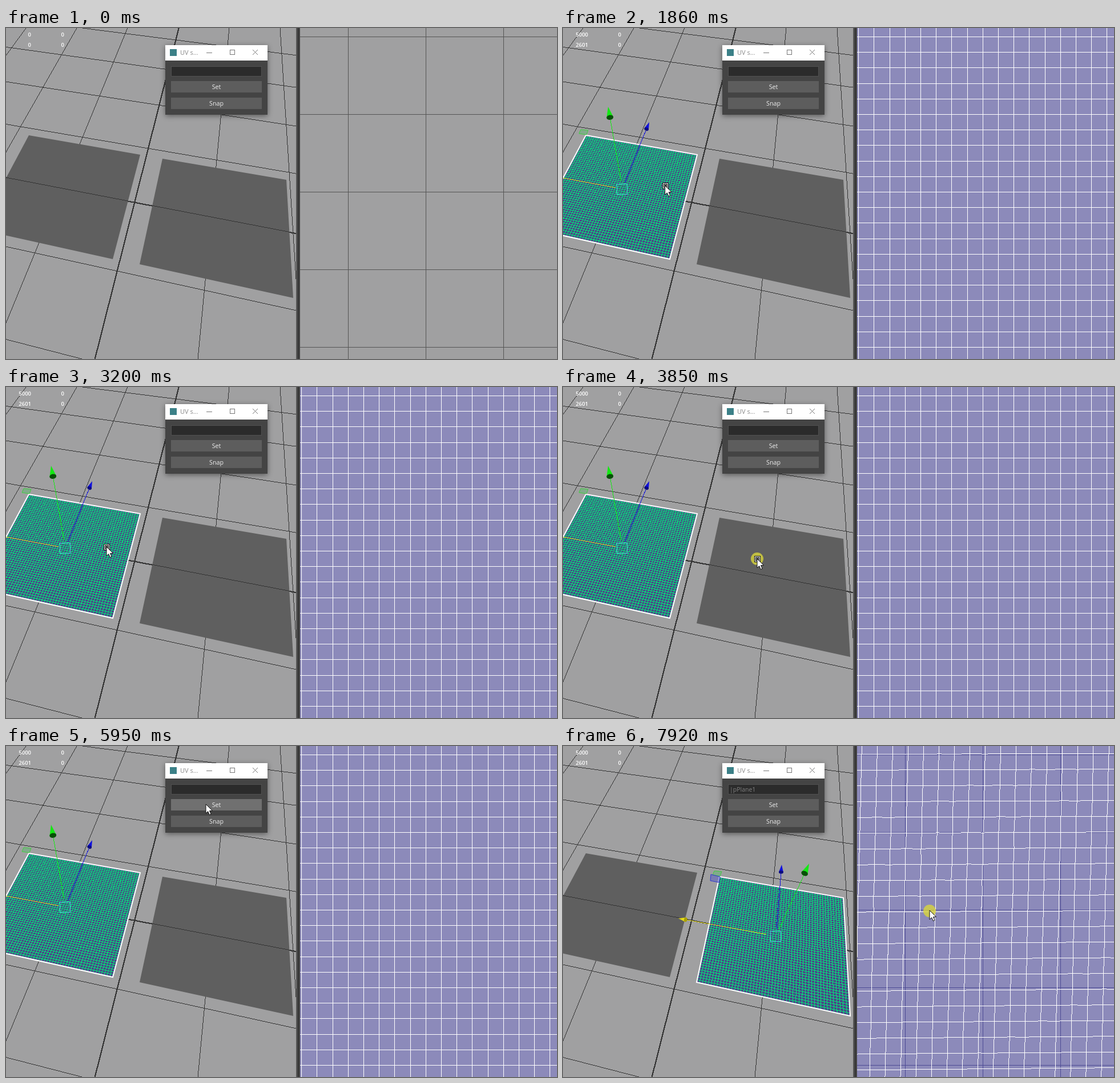
Write an HTML page with a canvas that moves like this. It is 965 px wide and 580 px high and loops after 8 s.

```html
<!DOCTYPE html>
<html lang="en">
<head>
<meta charset="utf-8">
<title>UV snap tool</title>
<style>
  html, body { margin: 0; width: 100%; height: 100%; overflow: hidden; background: #a0a0a1; }
  canvas { display: block; }
</style>
</head>
<body>
<canvas id="stage" width="965" height="580"></canvas>
<script>
const LOOP = 8000, LAG = 100, HOLD = 120, PRESS = 110, ARRIVE = 140;
const WIDTH = 965, HEIGHT = 580, VIEW_W = 508, UV_X = 515, CELL = 27.2;
const GREY = '#a0a0a1', DARK = '#343434';
const FONT = '"Open Sans", "Noto Sans", sans-serif';
const stage = document.getElementById('stage').getContext('2d');
let ctx = stage;

// Corners run top left, top right, bottom right, bottom left.
const ground = projector([[163.9, 119.2], [376.6, 151.8], [347.4, 459.6], [50.6, 394.2]]);
const planes = {
  left: {
    quad: [[40, 188], [235, 222], [187, 405], [-48, 353]],
    center: [104, 282], up: [79, 138], depth: [151, 165], side: [-20, 259]
  },
  right: {
    quad: [[274, 229], [491, 266], [503, 473], [234, 414]],
    center: [373, 333], up: [431, 206], depth: [383, 208], side: [202, 302]
  }
};

// Where the pointer stops, and what its click does.
const stops = [
  { time: 0, x: 540, y: 590 },
  { time: 940, x: 319, y: 332, pick: 'right' },
  { time: 1740, x: 178, y: 275, pick: 'left' },
  { time: 2480, x: 333, y: 312, pick: 'right' },
  { time: 3100, x: 176, y: 279, pick: 'left' },
  { time: 3900, x: 340, y: 300, pick: 'right' },
  { time: 4690, x: 190, y: 257, pick: 'left' },
  { time: 6090, x: 350, y: 102, button: 'Set' },
  { time: 6760, x: 335, y: 310, pick: 'right' },
  { time: 7330, x: 748, y: 312 },
  { time: 7800, x: 642, y: 288, drag: true }
];
const setClick = stops.find(s => s.button).time;
const lastPick = stops.filter(s => s.pick).pop().time;

// Perspective map from the unit square to a quad.
function projector([[x0, y0], [x1, y1], [x2, y2], [x3, y3]]) {
  const ax = x1 - x2, bx = x3 - x2, sx = x0 - x1 + x2 - x3;
  const ay = y1 - y2, by = y3 - y2, sy = y0 - y1 + y2 - y3;
  const det = ax * by - bx * ay;
  const g = (sx * by - bx * sy) / det, h = (ax * sy - sx * ay) / det;
  return (u, v) => {
    const w = g * u + h * v + 1;
    return [((x1 - x0 + g * x1) * u + (x3 - x0 + h * x3) * v + x0) / w,
            ((y1 - y0 + g * y1) * u + (y3 - y0 + h * y3) * v + y0) / w];
  };
}

const mix = ([x0, y0], [x1, y1], f) => [x0 + (x1 - x0) * f, y0 + (y1 - y0) * f];

function rect(x, y, w, h, color) {
  ctx.fillStyle = color;
  ctx.fillRect(x, y, w, h);
}
function frame(x, y, w, h, color) {
  ctx.strokeStyle = color;
  ctx.lineWidth = 1;
  ctx.strokeRect(x + .5, y + .5, w, h);
}
function polygon(points, fill, stroke, width = 1) {
  ctx.beginPath();
  points.forEach(p => ctx.lineTo(...p));
  ctx.closePath();
  if (fill) { ctx.fillStyle = fill; ctx.fill(); }
  if (stroke) { ctx.strokeStyle = stroke; ctx.lineWidth = width; ctx.stroke(); }
}
// A line without antialiasing.
function hardLine(a, b, color, width = 1) {
  const steps = Math.ceil(Math.max(Math.abs(b[0] - a[0]), Math.abs(b[1] - a[1])));
  ctx.fillStyle = color;
  for (let s = 0; s <= steps; s++) {
    const [x, y] = mix(a, b, s / steps);
    ctx.fillRect(Math.floor(x), Math.floor(y), width, width);
  }
}
function text(str, x, y, size, color, align = 'left', weight = 400) {
  ctx.font = `${weight} ${size}px ${FONT}`;
  ctx.textAlign = align;
  ctx.fillStyle = color;
  ctx.fillText(str, x, y);
}
function layer(paint) {
  const canvas = document.createElement('canvas');
  canvas.width = WIDTH;
  canvas.height = HEIGHT;
  ctx = canvas.getContext('2d');
  paint();
  ctx = stage;
  return canvas;
}

function drawMesh(quad) {
  const at = projector(quad);
  polygon(quad, '#4a4688');
  for (let i = 0; i <= 50; i++) {
    hardLine(at(i / 50, 0), at(i / 50, 1), '#00e878');
    hardLine(at(0, i / 50), at(1, i / 50), '#00e878');
  }
  polygon(quad, null, '#fff', 2);
}

function drawArrow(from, tip, length, half, color, shade) {
  const size = Math.hypot(tip[0] - from[0], tip[1] - from[1]);
  const dx = (tip[0] - from[0]) / size, dy = (tip[1] - from[1]) / size;
  const base = [tip[0] - dx * length, tip[1] - dy * length];
  hardLine(mix(from, tip, .1), base, color);
  polygon([tip, [base[0] - dy * half, base[1] + dx * half],
           [base[0] + dy * half, base[1] - dx * half]], color);
  ctx.beginPath();
  ctx.ellipse(...base, half * .7, half, Math.atan2(dy, dx), 0, 7);
  ctx.fillStyle = shade;
  ctx.fill();
}

function drawGizmo({ quad, center, up, depth, side }) {
  const [x, y] = quad[0];
  polygon([[x - 9, y - 10], [x + 4, y - 9], [x + 1, y - 1], [x - 12, y - 3]],
          'rgba(60,200,90,.3)', '#3fcf3f');
  drawArrow(center, up, 19, 6, '#14e814', '#075007');
  drawArrow(center, depth, 13, 4, '#1010dd', '#0a0a80');
  drawArrow(center, side, 13, 4, '#e6dc18', '#a8a000');
  frame(center[0] - 10, center[1] - 9, 18, 18, '#48d4d8');
  if (quad === planes.right.quad)
    polygon([[259, 225], [275, 229], [273, 239], [258, 236]], 'rgba(70,80,200,.45)', '#3038d0');
}

function paintViewport(selected) {
  rect(0, 0, VIEW_W, HEIGHT, GREY);
  for (let k = -2; k <= 4; k++)
    hardLine(ground(-2, k / 3), ground(2.5, k / 3), DARK, k === 2 ? 2 : 1);
  for (let k = -2; k <= 3; k++)
    hardLine(ground(k / 2, -1.5), ground(k / 2, 2), DARK, k === 1 ? 2 : 1);

  for (const name in planes) polygon(planes[name].quad, '#5f5f5f');
  hardLine(ground(-2, 2 / 3), ground(2.5, 2 / 3), DARK);
  if (selected) {
    drawMesh(planes[selected].quad);
    drawGizmo(planes[selected]);
  }
  [selected ? '5000' : '0', selected ? '2601' : '0'].forEach((count, row) => {
    text(count, 44, 14.5 + row * 18, 9.5, '#fff', 'right', 600);
    text('0', 102, 14.5 + row * 18, 9.5, '#fff', 'right', 600);
  });
  ctx.clearRect(VIEW_W, 0, WIDTH, HEIGHT);
}

function warped(i, j) {
  const x = 523 + 27.05 * i - .64 * j + Math.sin(i * 13 + j * 78) * .4;
  const drop = (x - 516) / 450 * (1.5 + .12 * j);
  return [x, 14.6 + 27.65 * j - drop + Math.sin(i * 41 + j * 19) * .25];
}

function squareGrid(cell, x0, color) {
  for (let x = x0; x < WIDTH; x += cell) rect(Math.round(x), 0, 1, HEIGHT, color);
  for (let y = 15; y < HEIGHT; y += cell) rect(UV_X, Math.round(y), WIDTH, 1, color);
}

function paintUv(shell) {
  rect(UV_X, 0, WIDTH, HEIGHT, shell ? '#8c8aba' : GREY);
  squareGrid(CELL * 5, 599, shell ? '#4d4b94' : '#555');
  if (shell === 'left') squareGrid(CELL, 517.2, '#fff');
  if (shell === 'right') {
    for (let a = -1; a < 23; a++)
      for (let b = -1; b < 23; b++) {
        hardLine(warped(a, b), warped(a, b + 1), '#fff');
        hardLine(warped(b, a), warped(b + 1, a), '#fff');
      }
  }
  ctx.clearRect(0, 0, UV_X, HEIGHT);
  rect(VIEW_W, 0, 7, HEIGHT, '#444');
  rect(VIEW_W, 0, 2, HEIGHT, '#575757');
  rect(VIEW_W + 3, 0, 2, HEIGHT, '#363636');
}

function drawDialog(t, [px, py]) {
  const pressing = t >= setClick - PRESS && t < setClick;
  const active = t >= setClick - PRESS && t < lastPick;
  const glyph = active ? '#111' : '#777';
  ctx.save();
  ctx.shadowColor = 'rgba(0,0,0,.45)';
  ctx.shadowBlur = 9;
  ctx.shadowOffsetY = 2;
  rect(279, 30, 179, 122, '#444');
  ctx.restore();
  rect(279, 30, 179, 27, '#fff');
  rect(287, 37, 12, 12, '#3b8087');
  text('UV s...', 305, 47, 11, active ? '#111' : '#888');
  rect(351, 43, 10, 1, glyph);
  frame(392, 38, 8, 8, glyph);
  hardLine([432, 38], [440, 46], glyph);
  hardLine([440, 38], [432, 46], glyph);

  rect(289, 67, 159, 18, '#505050');
  rect(290, 68, 157, 16, '#2b2b2b');
  if (t >= setClick) text('|pPlane1', 292, 80, 10.5, '#808080');
  ['Set', 'Snap'].forEach((label, row) => {
    const y = 93 + row * 29;
    const hover = px > 289 && px < 448 && py > y && py < y + 20;
    rect(289, y, 159, 20, !hover ? '#5d5d5d' : pressing ? '#333' : '#707070');
    text(label, 368.5, y + 14, 10.7, '#eee', 'center');
  });
}

function pointerAt(t) {
  const n = stops.findIndex(s => s.time + HOLD > t);
  if (n < 0) return [stops.at(-1).x, stops.at(-1).y];
  const from = stops[Math.max(n - 1, 0)], to = stops[n];
  const begin = from.time + HOLD, end = to.time - ARRIVE;
  const u = Math.min(1, Math.max(0, (t - begin) / (end - begin)));
  return mix([from.x, from.y], [to.x, to.y], 1 - (1 - u) ** 2);
}

function drawPointer(t, [x, y]) {
  const pressed = stops.some(s => (s.pick || s.button || s.drag)
    && t >= s.time - PRESS && (s.drag || t < s.time - 10));
  if (pressed) {
    ctx.beginPath();
    ctx.arc(x, y + 1, 11, 0, 7);
    ctx.fillStyle = 'rgba(216,212,60,.8)';
    ctx.fill();
  }
  const overDialog = x > 279 && x < 458 && y > 30 && y < 152;
  const picking = x < VIEW_W && !overDialog;
  if (picking) {
    const bx = Math.round(x) - 5, by = Math.round(y) - 4;
    rect(bx, by, 11, 11, '#111');
    frame(bx + 1, by + 1, 8, 8, '#fff');
    frame(bx + 3, by + 3, 4, 4, '#aaa');
  }
  const outline = [[0, 0], [0, 16], [3.7, 12.6], [6.3, 18.5], [9, 17.3], [6.5, 11.6], [11.5, 11.3]];
  polygon(outline.map(([dx, dy]) => [x + dx, y + dy + (picking ? 1 : 0)]), '#fff', '#111');
}

function pickAt(t) {
  const done = stops.filter(s => s.pick && s.time <= t);
  return done.length ? done.at(-1).pick : 'none';
}

const viewports = {}, uvPanels = {};
for (const name of ['none', 'left', 'right']) {
  const selected = name === 'none' ? null : name;
  viewports[name] = layer(() => paintViewport(selected));
  uvPanels[name] = layer(() => paintUv(selected));
}

const start = performance.now();
function draw() {
  const t = (performance.now() - start) % LOOP, tip = pointerAt(t);
  ctx.drawImage(viewports[pickAt(t - LAG)], 0, 0);
  ctx.drawImage(uvPanels[pickAt(t)], 0, 0);
  drawDialog(t, tip);
  drawPointer(t, tip);
  requestAnimationFrame(draw);
}
draw();
</script>
</body>
</html>
```
